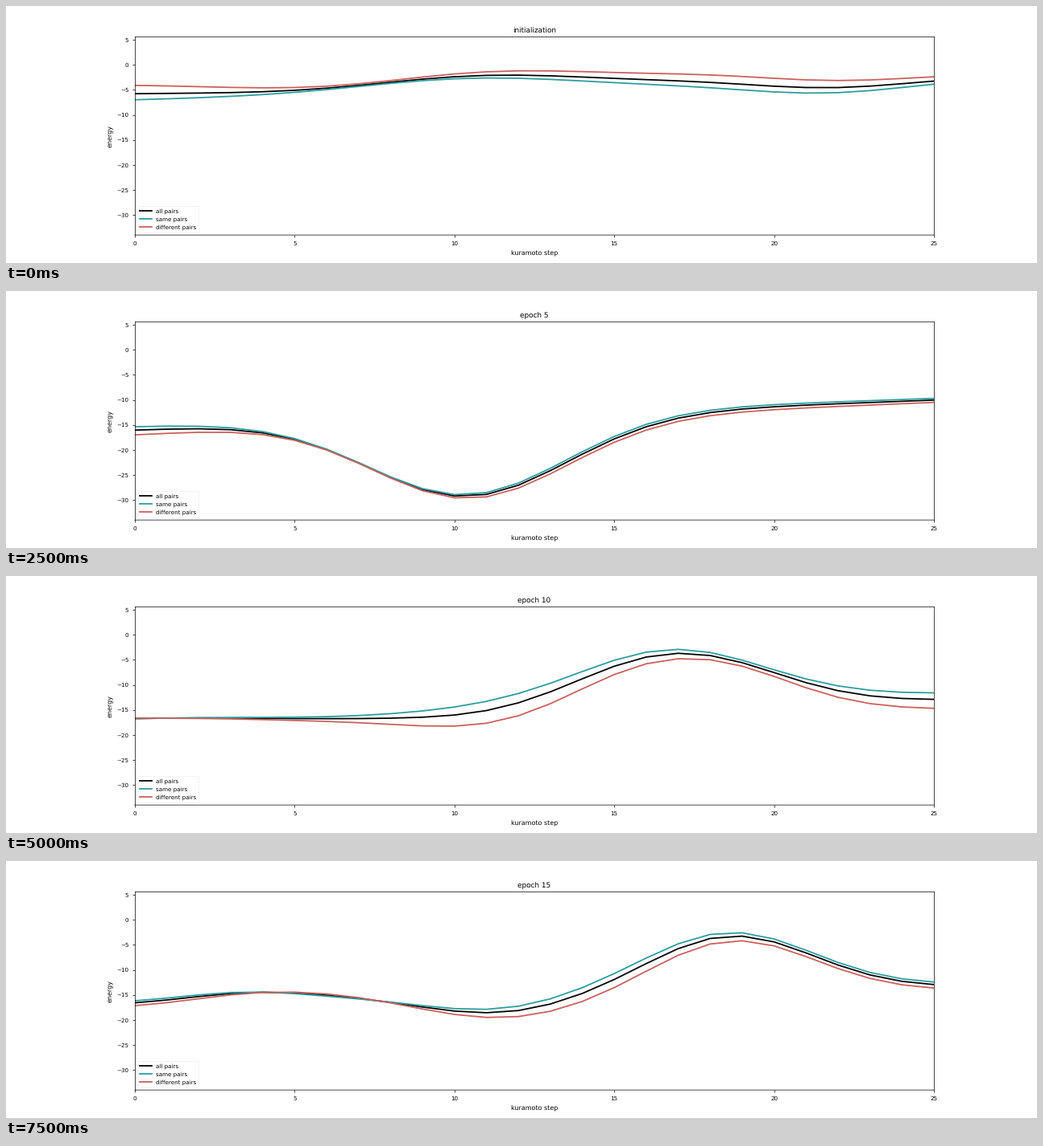
These frames come from a looping animation (1280 px wide and 320 px high, 8000 ms). A matplotlib script:

```python
import numpy as np
import matplotlib.pyplot as plt
from matplotlib.animation import FuncAnimation

plt.rcParams.update({"font.family": "DejaVu Sans", "text.hinting": "none",
                     "axes.labelpad": 4.6})

EPOCHS = 16
STEPS = np.arange(26)
DIFF_SHARE = 0.42


def wave(start, end, *swells):
    """Straight drift plus bell-shaped swells (center, height, width)."""
    y = start + (end - start) * STEPS / STEPS[-1]
    for center, height, width in swells:
        y = y + height * np.exp(-((STEPS - center) / width) ** 2)
    return y


# epoch: energy of same pairs, gap from same to different pairs
KEYS = {
    0: (wave(-7, -3, (10.5, 2.65, 4.8), (21.7, -2.1, 3.5)),
        wave(3.2, 1, (6.8, -2.05, 5), (20.5, 1.3, 4.5))),
    3: (wave(-8.7, -4.2, (2.2, 0.9, 1.8), (9.05, -8.5, 3.6), (16, -4.1, 5.5)),
        wave(0, 0.85, (8.1, -3.3, 4.5))),
    5: (wave(-15.3, -9.7, (10.4, -16, 4.4)),
        wave(-1.8, -0.8, (6.5, 1.4, 4.5))),
    7: (wave(-15, -8.1, (9.1, -4.7, 4.6), (17.7, 8.3, 3.5)),
        wave(0.4, -0.9, (11.6, -4.2, 3.9))),
    10: (wave(-16.7, -11.8, (6.5, -0.85, 4), (16.8, 10.5, 4.15)),
         wave(0.1, -3.1, (11.4, -3.1, 3.5), (19.5, 1.2, 2.5))),
    13: (wave(-15.2, -15, (17.7, 14.4, 4.5), (24, -5.5, 3.5)),
         wave(-0.6, -1.4, (11.6, -2.3, 4.7))),
    15: (wave(-16.5, -13, (3.4, 1.6, 2.7), (11.2, -3.1, 3.2),
              (18.6, 11.4, 3.7)),
         wave(-1, -1.2, (6, 1.5, 3), (14.7, -1.7, 3.7))),
}


def energies(epoch):
    """Energy of all, same and different pairs, blended between keys."""
    lo = max(e for e in KEYS if e <= epoch)
    hi = min(e for e in KEYS if e >= epoch)
    t = (epoch - lo) / max(hi - lo, 1)
    same, gap = ((1 - t) * a + t * b for a, b in zip(KEYS[lo], KEYS[hi]))
    return same + DIFF_SHARE * gap, same, same + gap


fig, ax = plt.subplots(figsize=(20, 5), dpi=64)
fig.subplots_adjust(bottom=0.109)
ax.set(xlim=(0, 25), ylim=(-34, 5.6),
       xticks=range(0, 26, 5), yticks=range(-30, 6, 5))
ax.spines["bottom"].set_snap(False)
ax.tick_params(labelsize=8, pad=5)
ax.set_xlabel("kuramoto step", fontsize=9)
ax.set_ylabel("energy", fontsize=9)
title = ax.set_title("initialization", fontsize=10)

styles = [("all pairs", "black"), ("same pairs", "#2a9da0"),
          ("different pairs", "#cb5f5c")]
lines = [ax.plot(STEPS, 0 * STEPS, color=color, lw=2, label=label)[0]
         for label, color in styles]
ax.legend(loc="lower left", bbox_to_anchor=(0, -0.002), fontsize=8,
          labelspacing=0.47, edgecolor="0.93")


def update(epoch):
    title.set_text(f"epoch {epoch}" if epoch else "initialization")
    for line, energy in zip(lines, energies(epoch)):
        line.set_ydata(energy)
    return [title, *lines]


anim = FuncAnimation(fig, update, frames=EPOCHS, interval=500, repeat=True)
plt.show()
```
